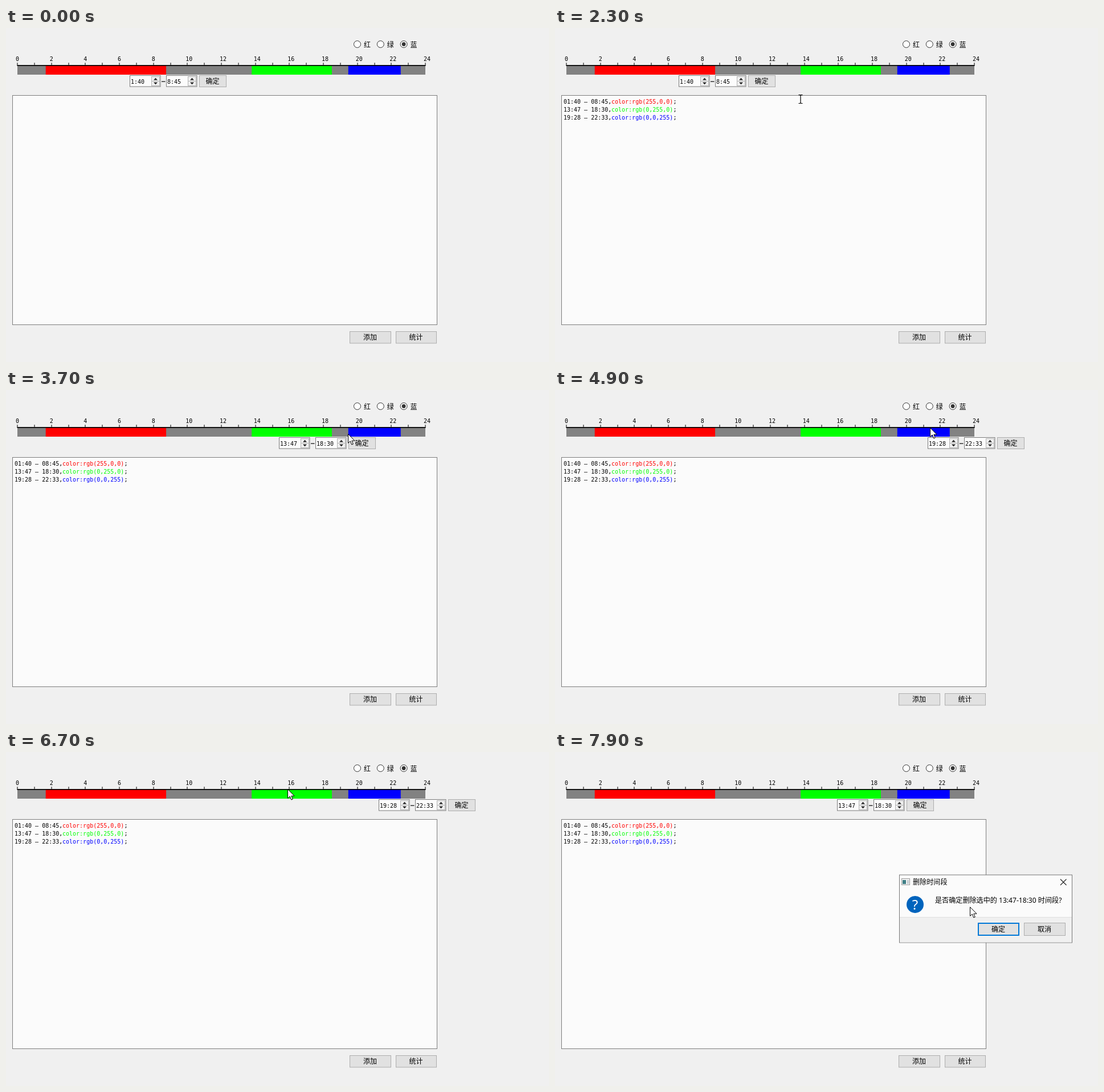
Animation of 953 by 587 pixels, one loop 8 s. Source, as an HTML page:

```html
<!DOCTYPE html>
<html lang="zh">
<head>
<meta charset="utf-8">
<title>时间段</title>
<style>
  html, body { margin: 0; width: 100%; height: 100%; overflow: hidden; background: #f0f0f0; }
  svg { position: absolute; left: 0; top: 0; display: block; }
  text { white-space: pre; fill: #000; }
  .mono { font: 10px "DejaVu Sans Mono", "Liberation Mono", monospace; }
  .han { font: 12px "Noto Sans CJK SC", "Noto Sans CJK", sans-serif; }
  .ui { font: 12.1px "Noto Sans", "Noto Sans CJK SC", "Noto Sans CJK", sans-serif; }
  .mark { font: 24px "Noto Sans", sans-serif; }
  .mid { text-anchor: middle; }
</style>
</head>
<body>
<svg id="stage" width="953" height="587" viewBox="0 0 953 587"></svg>
<script>
const LOOP = 8000, STEP = 100;
const stage = document.getElementById('stage');

function add(parent, tag, attrs, text) {
  const node = document.createElementNS('http://www.w3.org/2000/svg', tag);
  for (const key in attrs) node.setAttribute(key, attrs[key]);
  if (text !== undefined) node.textContent = text;
  return parent.appendChild(node);
}
const group = () => add(stage, 'g', {});
const fillRect = (p, x, y, width, height, fill) => add(p, 'rect', { x, y, width, height, fill });
const frame = (p, x, y, w, h, fill, stroke) =>
  add(p, 'rect', { x: x + .5, y: y + .5, width: w - 1, height: h - 1, fill, stroke });
const label = (p, x, y, text, cls, fill = '#000') =>
  add(p, 'text', { x, y, class: cls, style: `fill:${fill}` }, text);
const path = (p, d, attrs) => add(p, 'path', { d, ...attrs });
const show = (node, on) => node.setAttribute('visibility', on ? 'visible' : 'hidden');

function button(p, x, y, w, h, text, cls = 'han mid') {
  const face = frame(p, x, y, w, h, '#e1e1e1', '#adadad');
  label(p, x + w / 2 - .5, y + h / 2 + 4.5, text, cls);
  return face;
}

// Time ranges, in minutes of the day
const ranges = [
  { from: 100, to: 525, rgb: '255,0,0' },
  { from: 827, to: 1110, rgb: '0,255,0' },
  { from: 1168, to: 1353, rgb: '0,0,255' }
];
const axisX = minutes => 20 + minutes * 716 / 1440;
const clock = (minutes, pad) =>
  String(Math.floor(minutes / 60)).padStart(pad, '0') + ':' + String(minutes % 60).padStart(2, '0');

// Colour choice
['红', '绿', '蓝'].forEach((name, i) => {
  const cx = 616.5 + i * 40.8;
  add(stage, 'circle', { cx, cy: 28.5, r: 6, fill: '#fff', stroke: '#333' });
  if (i === 2) add(stage, 'circle', { cx, cy: 28.5, r: 3.4, fill: '#333' });
  label(stage, cx + 11.5, 33.5, name, 'han');
});

// Day axis
fillRect(stage, 20, 66, 716, 16, '#828282');
for (const r of ranges) {
  fillRect(stage, axisX(r.from), 66, axisX(r.to) - axisX(r.from), 16, `rgb(${r.rgb})`);
}
fillRect(stage, 19.5, 65, 717, 1.7, '#000');
for (let hour = 0; hour <= 24; hour++) {
  const x = axisX(hour * 60);
  fillRect(stage, Math.round(x) - .5, 61, 1, 5, '#000');
  if (hour % 2 === 0) label(stage, x - 3, 58, hour, 'mono');
}

// Output area
frame(stage, 11, 118, 746, 404, '#fbfbfb', '#7d7d7d');
const log = group();
ranges.forEach((r, i) => {
  const y = 133 + i * 14;
  label(log, 15, y, `${clock(r.from, 2)} – ${clock(r.to, 2)},`, 'mono');
  const line = label(log, 99, y, `color:rgb(${r.rgb})`, 'mono', `rgb(${r.rgb})`);
  add(line, 'tspan', { style: 'fill:#000' }, ';');
});
button(stage, 603, 533, 73, 21.5, '添加');
const countButton = button(stage, 684, 533, 72, 21.5, '统计');

// Range editor
const editor = group();
function spinBox(x) {
  frame(editor, x, 83, 54.5, 20.5, '#fcfcfc', '#7a7a7a');
  for (const y of [85, 93]) frame(editor, x + 38, y, 15, 9, '#f0f0f0', '#b4b4b4');
  path(editor, `M${x + 42} 91.5h7l-3.5-3.7zM${x + 42} 95.5h7l-3.5 3.7z`, { fill: '#222' });
  return label(editor, x + 2, 97.5, '', 'mono');
}
const fromText = spinBox(0), toText = spinBox(64);
fillRect(editor, 56, 93.5, 6.5, 1.2, '#000');
button(editor, 122, 83, 48, 21, '确定');

// Confirmation dialog
const dialog = group();
frame(dialog, 604, 215.5, 304, 120, '#fbfbfb', '#777');
fillRect(dialog, 605, 290, 302, 44.5, '#f0f0f0');
fillRect(dialog, 605, 290, 302, 1, '#dfdfdf');
frame(dialog, 608, 222, 15, 12, '#f4f4f4', '#9a9a9a');
fillRect(dialog, 610, 225, 6, 7, '#3f7f86');
fillRect(dialog, 618, 225, 3, 7, '#c4ccd2');
label(dialog, 628, 232.5, '删除时间段', 'ui');
path(dialog, 'M887 223.5l10.5 10.5M897.5 223.5l-10.5 10.5', { stroke: '#222', 'stroke-width': 1.1 });
add(dialog, 'circle', { cx: 632, cy: 268, r: 15, fill: '#0064bd' });
label(dialog, 632, 276.5, '?', 'mark mid', '#fff');
label(dialog, 667, 265, '是否确定删除选中的 13:47-18:30 时间段?', 'ui');
button(dialog, 742.5, 300.5, 72, 22, '确定', 'ui mid').setAttribute('style', 'stroke:#0078d7;stroke-width:2');
button(dialog, 823, 300, 73, 23, '取消', 'ui mid');

// Pointers
const arrow = group();
path(arrow, 'M.5 .5V16.3L4.2 12.9 6.8 19 9.3 18 6.8 12.2H12Z', { fill: '#fff', stroke: '#000' });
const beam = group();
path(beam, 'M-3.5-7.5H-1L0-6.5 1-7.5H3.5M0-6.5V6.5M-3.5 7.5H-1L0 6.5 1 7.5H3.5',
  { fill: 'none', stroke: '#000', 'stroke-width': 1.2 });

// Pointer sweeps: each is a Bezier curve that begins where the previous one ended
const enter = [890, 160];
const sweeps = [
  { start: 100, end: 600, curve: [[740, 250], [720, 575]] },
  { start: 600, end: 1000, curve: [[718, 540]] },
  { start: 1300, end: 2100, curve: [[1350, 294], [172, 266], [341, 205]] },
  { start: 2100, end: 2900, curve: [[558, 15], [479, 66]] },
  { start: 3200, end: 4200, curve: [[631, 88], [658, 66]] },
  { start: 5000, end: 5500, curve: [[679, 158], [627, 190]] },
  { start: 5600, end: 6700, curve: [[650, 195], [513, 162], [494, 65]] },
  { start: 7200, end: 7900, curve: [[515, 88], [728, 272]] }
];
const mix = (a, b, k) => a + (b - a) * k;

function bezier(points, k) {
  if (points.length === 1) return points[0];
  return bezier(points.slice(1).map((p, i) => p.map((v, axis) => mix(points[i][axis], v, k))), k);
}
function pointerAt(time) {
  let at = enter;
  for (const { start, end, curve } of sweeps) {
    if (time <= start) break;
    at = bezier([at, ...curve], Math.min(1, (time - start) / (end - start)));
  }
  return at.map(Math.round);
}
const inside = (x, y, l, t, r, b) => x >= l && x < r && y >= t && y < b;

// Which range the editor shows, and where, from each moment on
const selections = [
  { since: 0, x: 217, range: ranges[0] },
  { since: 3100, x: 479, range: ranges[1] },
  { since: 4900, x: 654, range: ranges[2] },
  { since: 7000, x: 495, range: ranges[1] }
];

function render(now) {
  const time = Math.floor(now % LOOP / STEP) * STEP;

  const selected = selections.filter(s => s.since <= time).pop();
  editor.setAttribute('transform', `translate(${selected.x} 0)`);
  fromText.textContent = clock(selected.range.from, 1);
  toText.textContent = clock(selected.range.to, 1);

  const dialogOn = time >= 7300;
  const closed = (1 - Math.min(1, Math.max(0, (time - 7300) / 200))) ** 2;
  show(dialog, dialogOn);
  dialog.setAttribute('opacity', mix(1, .31, closed));
  dialog.setAttribute('transform',
    `translate(756 275.5) scale(${mix(1, .966, closed)}) translate(-756 -275.5)`);

  const [x, y] = pointerAt(time);
  const overText = !dialogOn && inside(x, y, 11, 118, 757, 522);
  for (const pointer of [arrow, beam]) {
    pointer.setAttribute('transform', `translate(${x} ${y})`);
    show(pointer, time >= 100 && overText === (pointer === beam));
  }

  const hover = inside(x, y, 684, 533, 756, 555), pressed = time === 1200;
  countButton.setAttribute('fill', pressed ? '#cce4f7' : hover ? '#e5f1fb' : '#e1e1e1');
  countButton.setAttribute('stroke', pressed ? '#005499' : hover ? '#0078d7' : '#adadad');
  show(log, time >= 1300);
}

const start = performance.now();
function tick() {
  render(performance.now() - start);
  requestAnimationFrame(tick);
}
tick();
</script>
</body>
</html>
```
